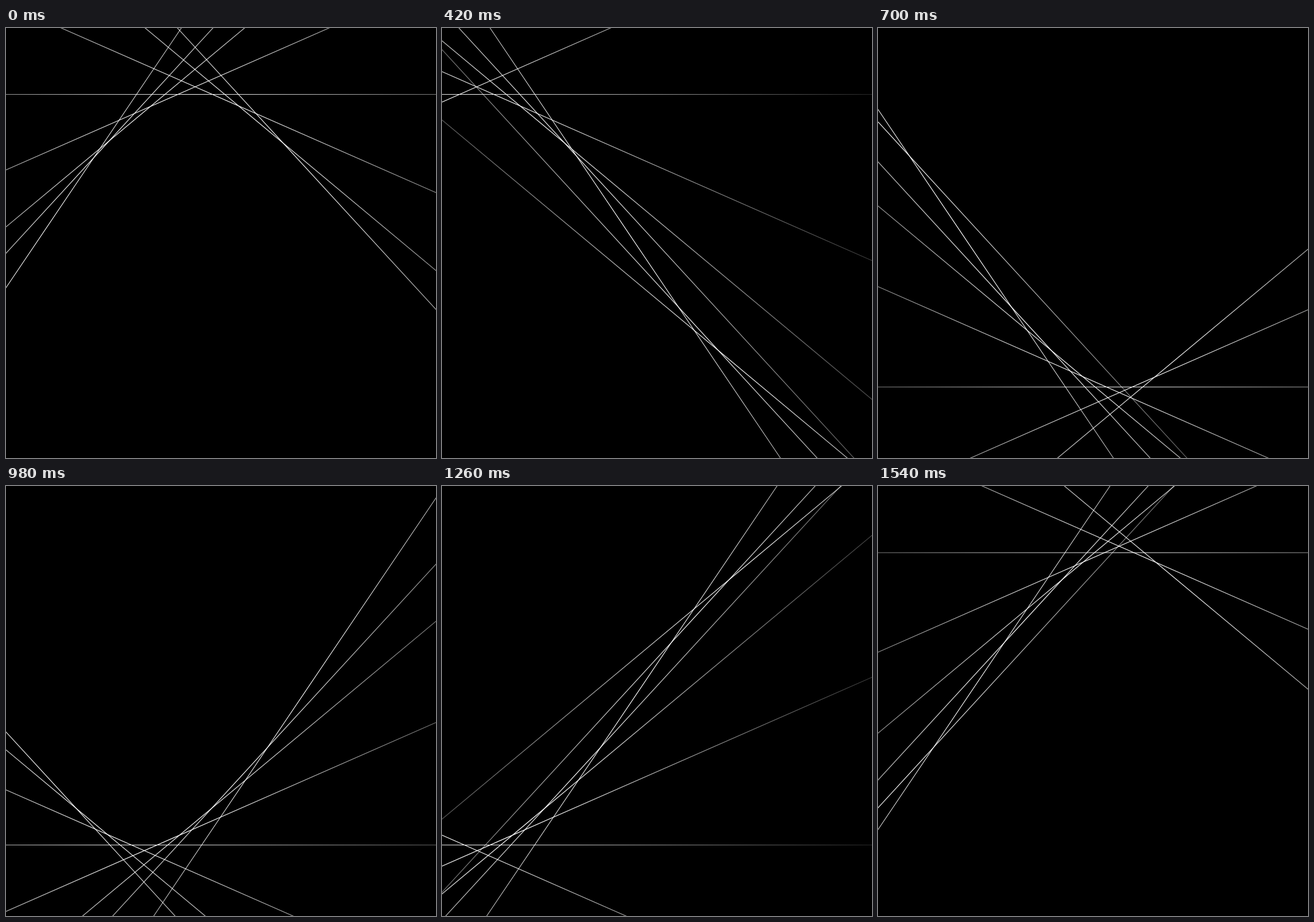
Write an HTML page with a canvas that moves like this. It is 748 px wide and 748 px high and loops after 1.68 s.

```html
<!DOCTYPE html>
<html lang="en">
<head>
<meta charset="utf-8">
<title>Tangent wave</title>
<style>
  html, body { margin: 0; width: 100%; height: 100%; overflow: hidden; background: #000; }
  canvas { display: block; }
</style>
</head>
<body>
<canvas id="stage" width="748" height="748"></canvas>
<script>
const ctx = document.getElementById('stage').getContext('2d');
const STEP_MS = 140, SCROLL = 89.6, VISIBLE = 8;
const REACH = 810;  // horizontal distance over which a tangent fades out

// First tangent of the visible run at each step.
const runStart = [0, 1, 2, 3, 5, 7, 8, 9, 10, 11, 13, 15];

// Tangents along the wave: touching point x, y and slope.
const A = 0.4394, B = 0.834, C = 1.0885, D = 1.481;
const tangents = [
  [67, 352.5, -D], [167, 210, -C], [226, 157.6, -B], [277, 125.2, -A],
  [329, 115.5, 0],
  [381, 125.2, A], [432, 158.4, B], [491, 209.9, C], [590, 351.9, D],
  [714, 522.3, C], [775, 582.2, B], [820, 613.3, A],
  [868, 624.5, 0],
  [919, 611.8, -A], [960, 581.5, -B], [1036, 505, -C], [1146, 360.2, -D],
  [1250, 223.7, -C], [1325, 147, -B], [1360, 124.6, -A],
  [1404.6, 116, 0],
  [1453, 125.8, A], [1500, 158.6, B]
];

function drawTangent(x, y, slope) {
  const rise = REACH * slope;
  const ends = [x - REACH, y - rise, x + REACH, y + rise];
  const fade = ctx.createLinearGradient(...ends);
  fade.addColorStop(0, 'rgba(255,255,255,0)');
  fade.addColorStop(0.5, '#fff');
  fade.addColorStop(1, 'rgba(255,255,255,0)');
  ctx.strokeStyle = fade;
  ctx.beginPath();
  ctx.moveTo(ends[0], ends[1]);
  ctx.lineTo(ends[2], ends[3]);
  ctx.stroke();
}

function render(time) {
  const step = Math.floor(time / STEP_MS) % runStart.length;
  const first = runStart[step];
  ctx.fillStyle = '#000';
  ctx.fillRect(0, 0, 748, 748);
  ctx.lineWidth = 1.2;
  for (const [x, y, slope] of tangents.slice(first, first + VISIBLE))
    drawTangent(x - step * SCROLL, y, slope);
}

const start = performance.now();
function tick() {
  render(performance.now() - start);
  requestAnimationFrame(tick);
}
tick();
</script>
</body>
</html>
```
